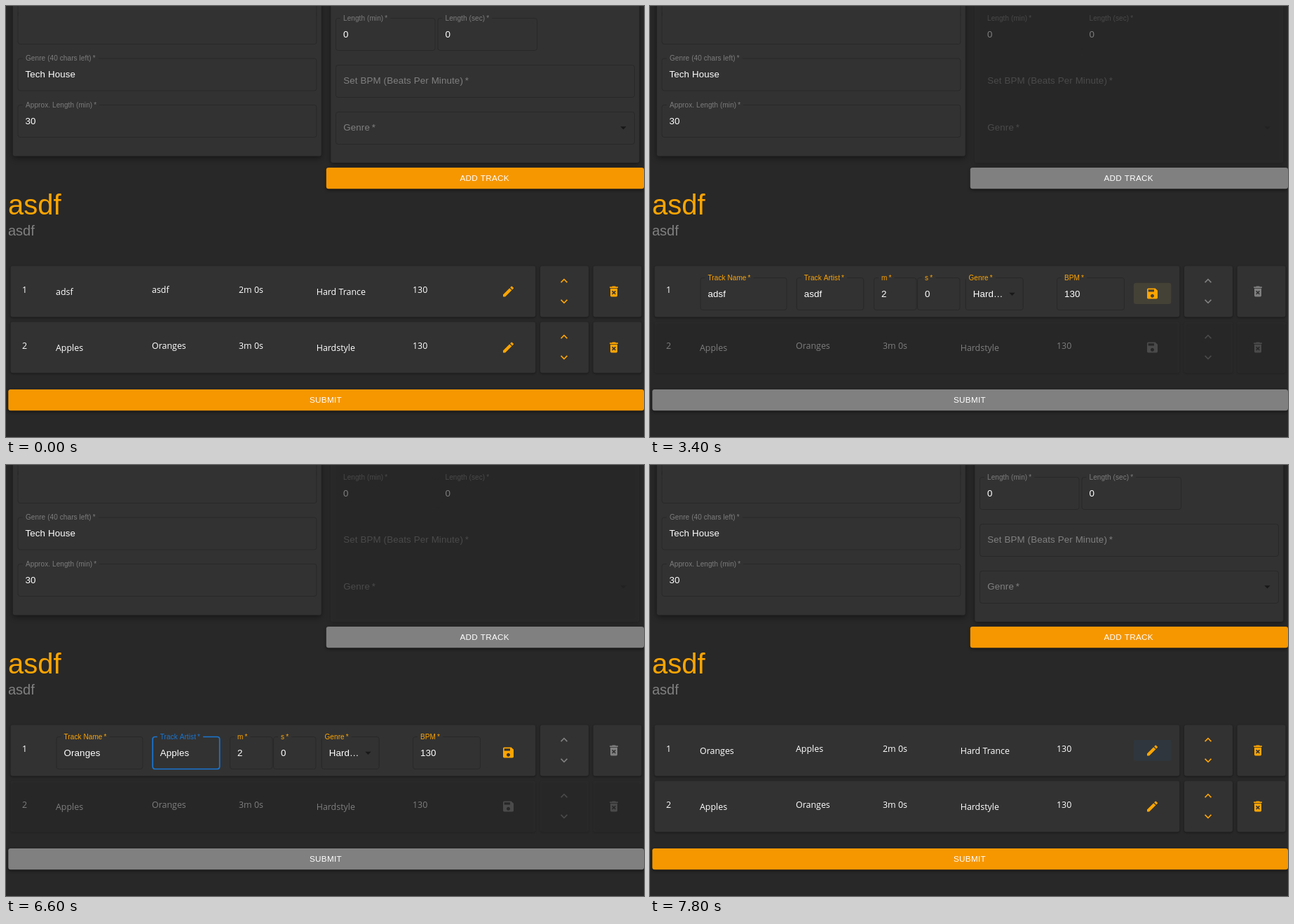
Write an HTML page with a canvas that moves like this. It is 910 by 616 pixels and loops after 8000 ms.

```html
<!DOCTYPE html>
<html lang="en">
<head>
<meta charset="utf-8">
<title>Track list editor</title>
<style>
html, body { margin: 0; width: 100%; height: 100%; overflow: hidden; background: #282828; }
canvas { display: block; }
</style>
</head>
<body>
<canvas id="stage" width="910" height="616"></canvas>
<script>
const ctx = document.getElementById('stage').getContext('2d');
const FORM = '"Liberation Sans", Arial, sans-serif';
const LIST = '"Open Sans", "Noto Sans", sans-serif';
const ORANGE = [255, 165, 0], BUTTON = [246, 151, 0], GRAY = [128, 128, 128], BLUE = [25, 118, 210];
const CARD = '#323232', LABEL = '#7d7d7d';

const icons = {
  edit: 'M3 17.25V21h3.75L17.81 9.94l-3.75-3.75L3 17.25zM20.71 7.04c.39-.39.39-1.02 0-1.41l-2.34-2.34a1 1 0 0 0-1.41 0l-1.83 1.83 3.75 3.75 1.83-1.83z',
  save: 'M17 3H5c-1.11 0-2 .9-2 2v14c0 1.1.89 2 2 2h14c1.1 0 2-.9 2-2V7l-4-4zm-5 16c-1.66 0-3-1.34-3-3s1.34-3 3-3 3 1.34 3 3-1.34 3-3 3zm3-10H5V5h10v4z',
  remove: 'M6 19c0 1.1.9 2 2 2h8c1.1 0 2-.9 2-2V7H6v12zm2.46-7.12l1.41-1.41L12 12.59l2.12-2.12 1.41 1.41L13.41 14l2.12 2.12-1.41 1.41L12 15.41l-2.12 2.12-1.41-1.41L10.59 14l-2.13-2.12zM15.5 4l-1-1h-5l-1 1H5v2h14V4z',
  up: 'M12 8l-6 6 1.41 1.41L12 10.83l4.59 4.58L18 14z',
  down: 'M16.59 8.59L12 13.17 7.41 8.59 6 10l6 6 6-6z'
};
for (const name in icons) icons[name] = new Path2D(icons[name]);

const mix = (a, b, k) => `rgb(${a.map((v, i) => Math.round(v + (b[i] - v) * k))})`;

// Value of the last [time, value] step reached.
const at = (t, steps) => steps.reduce((v, [start, next]) => t >= start ? next : v, steps[0][1]);

function text(str, x, y, size = 13.33, color = '#fff', spacing = .00938, family = FORM) {
  ctx.font = `${size}px ${family}`;
  ctx.letterSpacing = `${size * spacing}px`;
  ctx.fillStyle = color;
  ctx.fillText(str, x, y);
  return ctx.measureText(str).width;
}

const listText = (str, x, y) => text(str, x, y, 12.45, '#fff', 0, LIST);

function box(x, y, w, h, color, blur = 3, drop = 1) {
  ctx.save();
  ctx.shadowColor = 'rgba(0,0,0,.45)';
  ctx.shadowBlur = blur;
  ctx.shadowOffsetY = drop;
  ctx.fillStyle = color;
  ctx.beginPath();
  ctx.roundRect(x, y, w, h, 3.3);
  ctx.fill();
  ctx.restore();
}

function icon(name, cx, cy, color) {
  ctx.save();
  ctx.translate(cx - 10, cy - 10);
  ctx.scale(20 / 24, 20 / 24);
  ctx.fillStyle = color;
  ctx.fill(icons[name]);
  ctx.restore();
}

function arrow(x, y) {
  ctx.fillStyle = '#181818';
  ctx.beginPath();
  ctx.moveTo(x - 4.2, y - 2);
  ctx.lineTo(x + 4.2, y - 2);
  ctx.lineTo(x, y + 2.2);
  ctx.fill();
}

// Outlined input; the label sits in a gap of the top border.
function field(x, y, w, label, value, color = LABEL, focus = 0, labelX = x + 11) {
  ctx.save();
  if (label) {
    ctx.font = `10px ${FORM}`;
    ctx.letterSpacing = '.094px';
    const gap = ctx.measureText(label).width + 8;
    const clip = new Path2D();
    clip.rect(0, -40, 910, 700);
    clip.rect(labelX - 4, y - 3, gap, 6);
    ctx.clip(clip, 'evenodd');
  }
  ctx.strokeStyle = focus ? mix([39, 39, 39], BLUE, focus) : '#282828';
  ctx.lineWidth = focus ? 1.7 : 1;
  ctx.beginPath();
  ctx.roundRect(x + .5, y + .5, w - 1, 46, 3.3);
  ctx.stroke();
  ctx.restore();
  if (label) text(label, labelX, y + 3.5, 10, color);
  if (value) text(value, x + 11, y + 27.5);
}

function button(label, x, y, w, textX, color) {
  box(x, y, w, 30.3, color, 4, 2);
  text(label, textX, y + 18.6, 11.67, '#fff', .02857);
}

function trackForm() {
  box(463.3, -20, 440, 244, CARD, 6, 2);
  field(470, 17, 142.5, 'Length (min)\u2009*', '0');
  field(615.5, 17, 142.5, 'Length (sec)\u2009*', '0');
  field(470, 84, 427, '', '');
  text('Set BPM (Beats Per Minute)\u2009*', 481.3, 111.3, 13.33, '#808080');
  field(470, 151, 427, '', '');
  text('Genre\u2009*', 481.3, 178, 13.33, '#808080');
  arrow(880.5, 174.3);
}

function rowCards(y, side) {
  box(6.5, y, 748.8, 73, CARD);
  box(762, y, 69, 73, CARD);
  box(837.5, y, 69, 73, CARD);
  icon('up', 796, y + 21.3, side);
  icon('down', 796, y + 50.7, side);
  icon('remove', 867, y + 36.5, side);
}

function rowText(y, number, name, artist, length, genre) {
  listText(number, 23, y + 38.5);
  listText(name, 71, y + 41.7);
  listText(artist, 208, y + 38.5);
  listText(length, 332, y + 38.5);
  listText(genre, 442.7, y + 41.7);
  listText('130', 580, y + 38.5);
}

function actionGlow(y, hover, ripple) {
  ctx.save();
  ctx.beginPath();
  ctx.roundRect(690, y, 53.3, 30.3, 3.3);
  ctx.clip();
  if (hover) {
    ctx.fillStyle = `rgba(25,118,210,${.07 * hover})`;
    ctx.fillRect(690, y, 54, 31);
  }
  if (ripple) {
    const [x, cy, r, alpha] = ripple;
    ctx.fillStyle = `rgba(255,165,0,${alpha})`;
    ctx.beginPath();
    ctx.arc(x, cy, r, 0, 7);
    ctx.fill();
  }
  ctx.restore();
}

function textState(x, value, selected, caret) {
  ctx.font = `13.33px ${FORM}`;
  ctx.letterSpacing = '.125px';
  const w = ctx.measureText(value).width;
  if (selected) {
    ctx.fillStyle = '#0078d7';
    ctx.fillRect(x, 403, w, 15);
    text(value, x, 415.5);
  }
  if (caret) {
    ctx.fillStyle = '#fff';
    ctx.fillRect(Math.round(x + w) - 1, 403, 1, 15);
  }
}

function editRow(t) {
  const name = at(t, [[0, 'adsf'], [4600, 'O'], [4700, 'Or'], [4800, 'Oran'], [4900, 'Orang'], [5000, 'Oranges']]);
  const artist = at(t, [[0, 'asdf'], [5500, 'A'], [5700, 'Ap'], [5800, 'App'], [5900, 'Apple'], [6000, 'Apples']]);
  const nameFocus = at(t, [[0, 0], [4000, .5], [4100, 1], [5300, .4], [5400, 0]]);
  const artistFocus = at(t, [[0, 0], [5300, .5], [5400, 1], [7400, .5], [7500, 0]]);
  const tint = k => mix(ORANGE, BLUE, k);
  listText('1', 23, 410);
  field(71.5, 388, 124, 'Track Name\u2009*', name, tint(nameFocus), nameFocus);
  field(208.7, 388, 96.5, 'Track Artist\u2009*', artist, tint(artistFocus), artistFocus);
  field(319, 388, 61.5, 'm\u2009*', '2', tint(0));
  field(381, 388, 61.5, 's\u2009*', '0', tint(0));
  field(449.7, 388, 83, 'Genre\u2009*', 'Hard…', tint(0), 0, 454.5);
  arrow(516.5, 411.8);
  field(580, 388, 97, 'BPM\u2009*', '130', tint(0));
  textState(82.5, name, t >= 4100 && t < 4600, t >= 4600 && t < 5300);
  textState(219.7, artist, t >= 5300 && t < 5500, t >= 5500 && t < 6500 || t >= 7000 && t < 7400);
}

function draw(time) {
  const t = Math.floor(time % 8000 / 100) * 100;
  const editing = t >= 3200 && t < 7700;
  const saved = t >= 7700;
  const disabled = at(t, [[0, 0], [3300, .55], [3400, 1], [7700, .5], [7800, 0]]);
  const hover = at(t, [[0, 0], [3200, 1], [3700, 0], [6900, .4], [7000, .8], [7100, 1]]);
  const ripple = at(t, [[0, null], [3200, [717, 417, 7, .22]], [3300, [717, 414, 20, .18]],
    [3400, [717, 411, 60, .1]], [3500, null], [7600, [723, 409, 6, .2]], [7700, [719, 408, 60, .08]], [7800, null]]);
  const side = mix(ORANGE, GRAY, disabled);
  const main = mix(BUTTON, GRAY, disabled);
  const dim = editing ? .4 : 1;
  const action = editing ? 'save' : 'edit';

  ctx.fillStyle = '#282828';
  ctx.fillRect(0, 0, 910, 616);

  box(9.8, -20, 440, 234.5, CARD, 8, 3);
  field(16.5, 8, 427, '', '');
  ctx.fillStyle = CARD;
  ctx.fillRect(17.5, 0, 425, 14);
  ctx.fillStyle = '#282828';
  ctx.fillRect(16.5, 0, 1, 14);
  ctx.fillRect(442.5, 0, 1, 14);
  field(16.5, 74.5, 427, 'Genre (40 chars left)\u2009*', 'Tech House', LABEL, 0, 28);
  field(16.5, 141, 427, 'Approx. Length (min)\u2009*', '30', LABEL, 0, 28);

  ctx.globalAlpha = dim;
  trackForm();
  ctx.globalAlpha = 1;

  button('ADD TRACK', 456.8, 231, 453.2, 647.5, main);
  text('asdf', 3, 298, 40, mix(ORANGE, ORANGE, 0), 0);
  text('asdf', 3, 328, 20, '#808080', 0);

  rowCards(371.5, side);
  actionGlow(editing ? 395.8 : 392.8, hover, ripple);
  if (editing) editRow(t);
  else rowText(371.5, '1', saved ? 'Oranges' : 'adsf', saved ? 'Apples' : 'asdf', '2m 0s', 'Hard Trance');
  icon(action, 716.5, editing ? 411 : 408, mix(ORANGE, ORANGE, 0));

  ctx.globalAlpha = dim;
  rowCards(451.5, side);
  rowText(451.5, '2', 'Apples', 'Oranges', '3m 0s', 'Hardstyle');
  icon(action, 716.5, 488, side);
  ctx.globalAlpha = 1;

  button('SUBMIT', 3.3, 548, 906.7, 433, main);
}

function frame() {
  draw(performance.now());
  requestAnimationFrame(frame);
}
frame();
</script>
</body>
</html>
```
